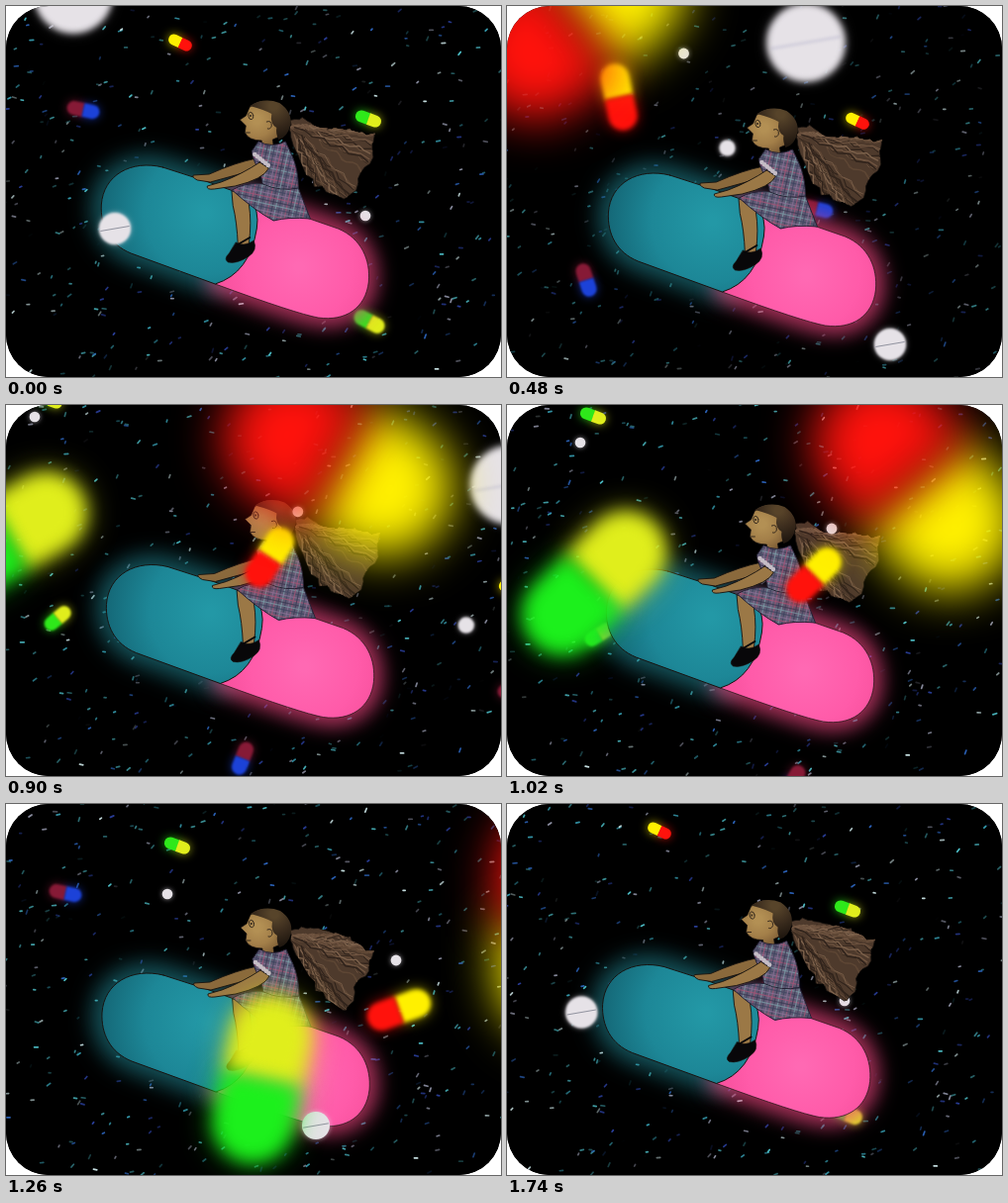
An HTML page with a canvas for the animation above (1.8 s loop, 500 px wide and 375 px high).

```html
<!DOCTYPE html>
<html lang="en">
<head>
<meta charset="utf-8">
<title>Capsule ride</title>
<style>
  html, body { margin: 0; width: 100%; height: 100%; overflow: hidden; background: #fff; }
  canvas { display: block; width: 500px; height: 375px; border-radius: 43px; background: #000; }
</style>
</head>
<body>
<canvas id="stage" width="500" height="375"></canvas>
<script>
const ctx = document.getElementById('stage').getContext('2d');
const LOOP = 1800, STEP = 60, RAD = Math.PI / 180;

function seeded(seed) {
  return () => {
    seed = (seed * 1664525 + 1013904223) % 4294967296;
    return seed / 4294967296;
  };
}

// Linear value between keys [time, ...values]; null outside their range.
function sample(keys, t) {
  for (let i = 1; i < keys.length; i++) {
    const a = keys[i - 1], b = keys[i];
    if (t >= a[0] && t <= b[0]) {
      const k = (t - a[0]) / (b[0] - a[0]);
      return a.slice(1).map((v, n) => v + (b[n + 1] - v) * k);
    }
  }
  return null;
}

function scoped(draw) {
  ctx.save();
  draw();
  ctx.restore();
}

// ---- Stars ----
const rnd = seeded(77);
const starColors = ['#4fc4cd', '#37a0b4', '#2b62b8', '#2a3f9c', '#c9e2e4', '#3a8f98', '#8a8da0'];
const stars = Array.from({ length: 520 }, () => ({
  x: rnd() * 540 - 40, y: rnd() * 400 - 25, phase: rnd(),
  size: 1.6 + rnd() * 2.4, angle: rnd() * 1.6 - 1.3, light: 0.4 + rnd() * 0.6,
  color: starColors[Math.floor(rnd() * starColors.length)]
}));
const starLight = [[0, 1], [240, .68], [480, .68], [720, .82], [1020, 1], [1800, 1]];

function drawStars(t) {
  const [level] = sample(starLight, t);
  ctx.lineWidth = 1.7;
  ctx.lineCap = 'round';
  for (const s of stars) {
    const life = (t / LOOP + s.phase) % 1;
    const x = s.x + 70 * (life - .5), y = s.y + 30 * (life - .5);
    const dx = Math.cos(s.angle) * s.size / 2, dy = Math.sin(s.angle) * s.size / 2;
    ctx.globalAlpha = level * s.light * Math.min(1, 2.2 * Math.sin(life * Math.PI));
    ctx.strokeStyle = s.color;
    ctx.beginPath();
    ctx.moveTo(x - dx, y - dy);
    ctx.lineTo(x + dx, y + dy);
    ctx.stroke();
  }
  ctx.globalAlpha = 1;
}

// ---- Drifting pills and tablets ----
const YELLOW = '#fff000', RED = '#ff120c', GREEN = '#2ee81a', LIME = '#e0ee1c',
      MAROON = '#861a36', BLUE = '#1c42d8';

// Pill keys: time, x, y, angle, scale. The angle points from the first colour to the second.
const pill = (len, wide, from, to, blur, keys, glow = 5) => ({ len, wide, from, to, blur, keys, glow });
// Tablet keys: time, x, y.
const tablet = (r, blur, keys) => ({ r, blur, keys });

const behind = [
  pill(25, 11, YELLOW, RED, .6, [[1440, 44, -23, 25, 1], [1800, 176, 37, 25, 1], [2520, 443, 156, 25, 1], [2760, 532, 196, 25, 1]]),
  pill(27, 12, GREEN, LIME, .6, [[900, 44, -5, 20, 1], [1020, 87, 11, 20, 1], [1260, 173, 42, 20, 1], [1740, 344, 106, 20, 1], [1800, 366, 114, 20, 1], [2040, 465, 153, 22, 1], [2220, 539, 182, 22, 1]]),
  pill(33, 15, GREEN, LIME, .8, [[660, -27, 185, -55, .9], [720, -9, 191, -52, .9], [1020, 93, 232, -32, .95], [1740, 343, 313, 22, 1], [1800, 367, 319, 28, 1], [2040, 473, 343, 45, 1], [2160, 526, 355, 53, 1]]),
  pill(25, 12, GREEN, LIME, .6, [[60, -58, 89, 20, 1], [240, 67, 143, 20, 1], [720, 401, 286, 22, 1], [900, 526, 340, 22, 1]]),
  pill(33, 14, MAROON, BLUE, .9, [[0, 78, 105, 12, 1], [240, 194, 155, 14, 1], [480, 313, 205, 14, 1], [720, 426, 254, 12, 1], [960, 542, 304, 12, 1]]),
  pill(33, 14, MAROON, BLUE, .9, [[1020, -56, 40, 12, 1], [1260, 60, 90, 12, 1], [1740, 275, 185, 12, 1]]),
  pill(34, 15, MAROON, BLUE, 1, [[60, -22, 210, 42, 1], [240, 22, 239, 54, 1], [480, 80, 277, 72, 1], [720, 164, 323, 98, 1], [1020, 289, 380, 120, 1], [1140, 340, 400, 130, 1]]),
  tablet(8, .8, [[60, -20, 64], [240, 84, 98], [720, 361, 189], [1020, 534, 245]]),
  tablet(5.3, .7, [[900, 29, 12], [1020, 74, 38], [1260, 163, 91], [1740, 341, 199], [1800, 363, 212], [2040, 435, 258], [2280, 512, 304]]),
  tablet(39, 3.2, [[0, 68, -12], [240, 185, 12], [480, 302, 37], [720, 420, 62], [960, 538, 87]])
];
const inFront = [
  tablet(5.4, .7, [[120, 78, -3], [240, 112, 14], [720, 245, 82], [1020, 328, 125], [1260, 394, 158], [1680, 510, 218]]),
  tablet(16, .8, [[1560, -29, 167], [1800, 110, 225], [2280, 387, 342], [2460, 491, 386]]),
  tablet(14, .7, [[1140, 244, 296], [1260, 313, 325], [1440, 417, 369], [1500, 452, 384]]),
  pill(66, 28, YELLOW, RED, 2.3, [[60, -38, 28, 42, 1.35], [240, 28, 56, 57, 1.15], [480, 113, 92, 78, 1.02], [720, 201, 127, 105, 1], [1020, 310, 172, 135, 1], [1260, 397, 208, 160, 1], [1620, 528, 262, 196, 1]], 7),
  pill(245, 140, YELLOW, RED, 24, [[60, -185, -25, 82, 1], [240, -73, -5, 110, 1], [480, 70, 12, 142, 1], [720, 220, 28, 176, 1], [1020, 413, 78, 230, 1], [1260, 566, 118, 270, 1], [1380, 640, 138, 285, 1]], 0),
  pill(168, 78, LIME, '#1cf01c', 9, [[720, -128, 58, 173, 1], [1020, 88, 180, 135, 1], [1260, 259, 278, 102, 1], [1560, 475, 400, 65, 1], [1680, 560, 448, 52, 1]], 16)
];

function halves(o) {
  const r = o.wide / 2, h = o.len / 2 - r;
  ctx.fillStyle = o.from;
  ctx.beginPath();
  ctx.arc(-h, 0, r, Math.PI / 2, -Math.PI / 2);
  ctx.lineTo(.3, -r);
  ctx.lineTo(.3, r);
  ctx.fill();
  ctx.fillStyle = o.to;
  ctx.beginPath();
  ctx.arc(h, 0, r, -Math.PI / 2, Math.PI / 2);
  ctx.lineTo(0, r);
  ctx.lineTo(0, -r);
  ctx.fill();
}

function drawPill(o, [x, y, angle, scale]) {
  scoped(() => {
    ctx.translate(x, y);
    ctx.rotate(angle * RAD);
    ctx.scale(scale, scale);
    if (o.glow) {
      ctx.filter = `blur(${o.glow}px)`;
      ctx.globalAlpha = .7;
      halves(o);
      ctx.globalAlpha = 1;
    }
    ctx.filter = `blur(${o.blur}px)`;
    halves(o);
  });
}

function drawTablet(o, [x, y]) {
  scoped(() => {
    ctx.translate(x, y);
    ctx.filter = `blur(${o.blur}px)`;
    ctx.shadowColor = 'rgba(235,230,240,.6)';
    ctx.shadowBlur = o.r > 30 ? 8 : 5;
    ctx.fillStyle = '#e6e2e7';
    ctx.beginPath();
    ctx.arc(0, 0, o.r, 0, 7);
    ctx.fill();
    ctx.shadowBlur = 0;
    if (o.r < 10) return;
    ctx.filter = o.r > 30 ? 'blur(1.5px)' : 'none';
    ctx.rotate(-.17);
    ctx.strokeStyle = o.r > 30 ? 'rgba(150,150,185,.35)' : '#8d8f9c';
    ctx.lineWidth = o.r > 30 ? 2 : .9;
    ctx.beginPath();
    ctx.moveTo(-o.r * .9, 0);
    ctx.lineTo(o.r * .9, 0);
    ctx.stroke();
  });
}

function drawLayer(list, t) {
  for (const o of list) {
    const pose = sample(o.keys, t) || sample(o.keys, t + LOOP);
    if (pose) (o.r ? drawTablet : drawPill)(o, pose);
  }
}

// ---- Capsule and rider ----
const sway = [[0, -3.7], [240, 0], [480, 2.4], [720, 3], [1020, .4], [1260, -3], [1500, -3.9], [1740, -3.4], [1800, -3.7]];
const bob = [[0, -6], [240, 0], [360, 3], [480, 2], [720, -2], [900, -5.5], [1020, -1], [1260, 4], [1380, 2], [1620, -2], [1740, -4.5], [1800, -6]];

const teal = new Path2D('M162 169Q205 182 250 199Q260 213 257 231Q250 276 215 287L130 256C108 247 99 228 100 207C102 177 130 161 162 169Z');
const pink = new Path2D('M235 195L339 231C363 241 372 263 370 285C367 311 347 325 319 321Q297 317 215 287Z');
const dress = new Path2D('M259 143Q272 150 286 143L293 158Q299 172 299 190L311 221Q289 219 274 223Q254 212 232 192Q245 184 263 186L260 172Q254 165 252 153Z');
const face = new Path2D('M250 108Q262 98 279 105Q289 112 287 125Q284 138 273 141L274 148L262 147L262 142Q249 142 245 134L246 127L240 121L246 117Z');
const scalp = new Path2D('M250 107Q264 98 280 104Q293 113 291 126Q288 139 279 141Q276 135 277 129Q270 125 272 115Q265 111 250 107Z');
const farArm = new Path2D('M257 160Q236 164 209 176L193 177Q191 179 197 182L210 184Q237 177 262 169Z');
const nearArm = new Path2D('M260 164L269 170Q264 181 235 188L214 191Q206 192 207 188L221 184Q242 176 260 164Z');
const leg = new Path2D('M232 193Q245 194 249 206Q252 224 249 247L238 248Q237 224 233 208Z');
const shoe = new Path2D('M236 245Q244 250 254 243Q258 253 249 259Q237 267 228 265Q223 262 229 256Z');

function ink(path, fill, width = .9) {
  ctx.fillStyle = fill;
  ctx.fill(path);
  if (width) {
    ctx.strokeStyle = '#17120f';
    ctx.lineWidth = width;
    ctx.stroke(path);
  }
}

function shade(x, y, r, ...colors) {
  const g = ctx.createRadialGradient(x, y, 4, x, y, r);
  colors.forEach((c, i) => g.addColorStop(i / (colors.length - 1), c));
  return g;
}

function glow(path, color, blur, alpha) {
  scoped(() => {
    ctx.filter = `blur(${blur}px)`;
    ctx.globalAlpha = alpha;
    ctx.fillStyle = color;
    ctx.fill(path);
    ctx.strokeStyle = color;
    ctx.lineWidth = 12;
    ctx.stroke(path);
  });
}

function drawCapsule() {
  glow(teal, '#20808c', 13, .75);
  glow(pink, '#e8447c', 11, .8);
  ink(pink, shade(300, 270, 105, '#ff69b3', '#ff5ba9', '#f24894'), .7);
  ink(teal, shade(205, 215, 120, '#2398a6', '#1d8797', '#125e6d'), 1);
}

// Ponytail outline, resting and lifted.
const hairLow = [[290, 125], [302, 121], [319, 121], [338, 127], [354, 132], [373, 147], [367, 164], [356, 181], [347, 206], [326, 194], [309, 170], [293, 142]];
const hairHigh = [[291, 122], [304, 119], [320, 130], [337, 131], [355, 130], [375, 135], [373, 157], [362, 180], [349, 200], [327, 195], [306, 178], [291, 138]];

function drawHair(t) {
  const k = Math.min(1, Math.max(0, .5 + .7 * Math.cos(2 * Math.PI * (t / 450 - .66))));
  const pts = hairHigh.map((p, i) => p.map((v, n) => v + (hairLow[i][n] - v) * k));
  const r = seeded(9);
  const outline = new Path2D();
  pts.forEach((p, i) => {
    const q = pts[(i + 1) % pts.length];
    const rough = i > 2 && i < 10 ? 5 : 2;
    for (let s = 0; s < 4; s++) {
      const x = p[0] + (q[0] - p[0]) * s / 4 + (r() - .5) * rough;
      const y = p[1] + (q[1] - p[1]) * s / 4 + (r() - .5) * rough;
      outline.lineTo(x, y);
    }
  });
  outline.closePath();
  ink(outline, '#4e3a2c', .8);
  scoped(() => {
    ctx.clip(outline);
    const tones = ['#30231b', '#6f5440', '#5f4735', '#7d624c', '#3d2d22'];
    for (let i = 0; i < 64; i++) {
      const pos = 3 + r() * 7, n = Math.min(9, Math.floor(pos)), f = pos - n;
      const ex = pts[n][0] + (pts[n + 1][0] - pts[n][0]) * f;
      const ey = pts[n][1] + (pts[n + 1][1] - pts[n][1]) * f;
      const start = r() * .65;
      ctx.strokeStyle = tones[i % tones.length];
      ctx.lineWidth = .7 + r();
      ctx.beginPath();
      for (let s = 0; s <= 8; s++) {
        const u = start + (1 - start) * s / 8;
        const wave = Math.sin(u * 24 + i) * 1.7;
        ctx.lineTo(pts[0][0] + (ex - pts[0][0]) * u + wave, pts[0][1] + 4 + (ey - pts[0][1] - 4) * u - wave);
      }
      ctx.stroke();
    }
  });
}

function drawDress() {
  ink(dress, '#605a73', 0);
  scoped(() => {
    ctx.clip(dress);
    ctx.translate(275, 182);
    ctx.rotate(.22);
    const stripes = ['#a85476', '#36364f', '#7c9fa8', '#3c435f', '#8d7298'];
    ctx.globalAlpha = .72;
    for (let i = -14; i < 15; i++) {
      ctx.strokeStyle = stripes[(i + 15) % 5];
      ctx.lineWidth = 1.2;
      ctx.beginPath();
      ctx.moveTo(i * 3.6, -60);
      ctx.lineTo(i * 3.6, 60);
      ctx.moveTo(-60, i * 3.6);
      ctx.lineTo(60, i * 3.6);
      ctx.stroke();
    }
  });
  ctx.strokeStyle = '#242033';
  ctx.lineWidth = 1;
  ctx.stroke(dress);
  ctx.stroke(new Path2D('M263 186Q281 194 299 190'));
}

function drawRider(t) {
  const skin = '#9b7846';
  ink(farArm, '#8a693c');
  ink(leg, skin);
  ink(shoe, '#080709', .6);
  ctx.strokeStyle = '#080709';
  ctx.lineWidth = 2;
  ctx.stroke(new Path2D('M238 247L250 240'));
  drawHair(t);
  ink(face, shade(257, 121, 30, '#b39054', '#a37f49', '#7a5a34'), .7);
  ink(scalp, shade(274, 107, 32, '#57442a', '#3c2d1e', '#211810'), 0);
  drawDress();
  ink(nearArm, skin);

  // Frilled sleeve
  ctx.fillStyle = '#c5bdc6';
  for (let i = 0; i < 6; i++) {
    ctx.beginPath();
    ctx.arc(255 + i * 2.7, 156 + i * 2.2, 2.3, 0, 7);
    ctx.fill();
  }
  ctx.strokeStyle = '#2a2018';
  ctx.lineWidth = .9;
  ctx.beginPath();
  ctx.ellipse(251, 117, 2.5, 3.7, -.2, 0, 7);
  ctx.stroke();
  ctx.fillStyle = '#2a2018';
  ctx.fillRect(250, 116, 1.4, 2);
  ctx.stroke(new Path2D('M246 134L250 134M267 123Q272 121 272 127Q271 131 268 130'));
}

function draw(t) {
  ctx.fillStyle = '#000';
  ctx.fillRect(0, 0, 500, 375);
  drawStars(t);
  drawLayer(behind, t);
  scoped(() => {
    ctx.translate(sample(sway, t)[0], sample(bob, t)[0]);
    ctx.lineJoin = 'round';
    drawCapsule();
    drawRider(t);
  });
  drawLayer(inFront, t);
}

const begin = performance.now();
let shown = -1;
function tick() {
  const t = Math.floor(((performance.now() - begin) % LOOP) / STEP) * STEP;
  if (t !== shown) draw(shown = t);
  requestAnimationFrame(tick);
}
tick();
</script>
</body>
</html>
```
